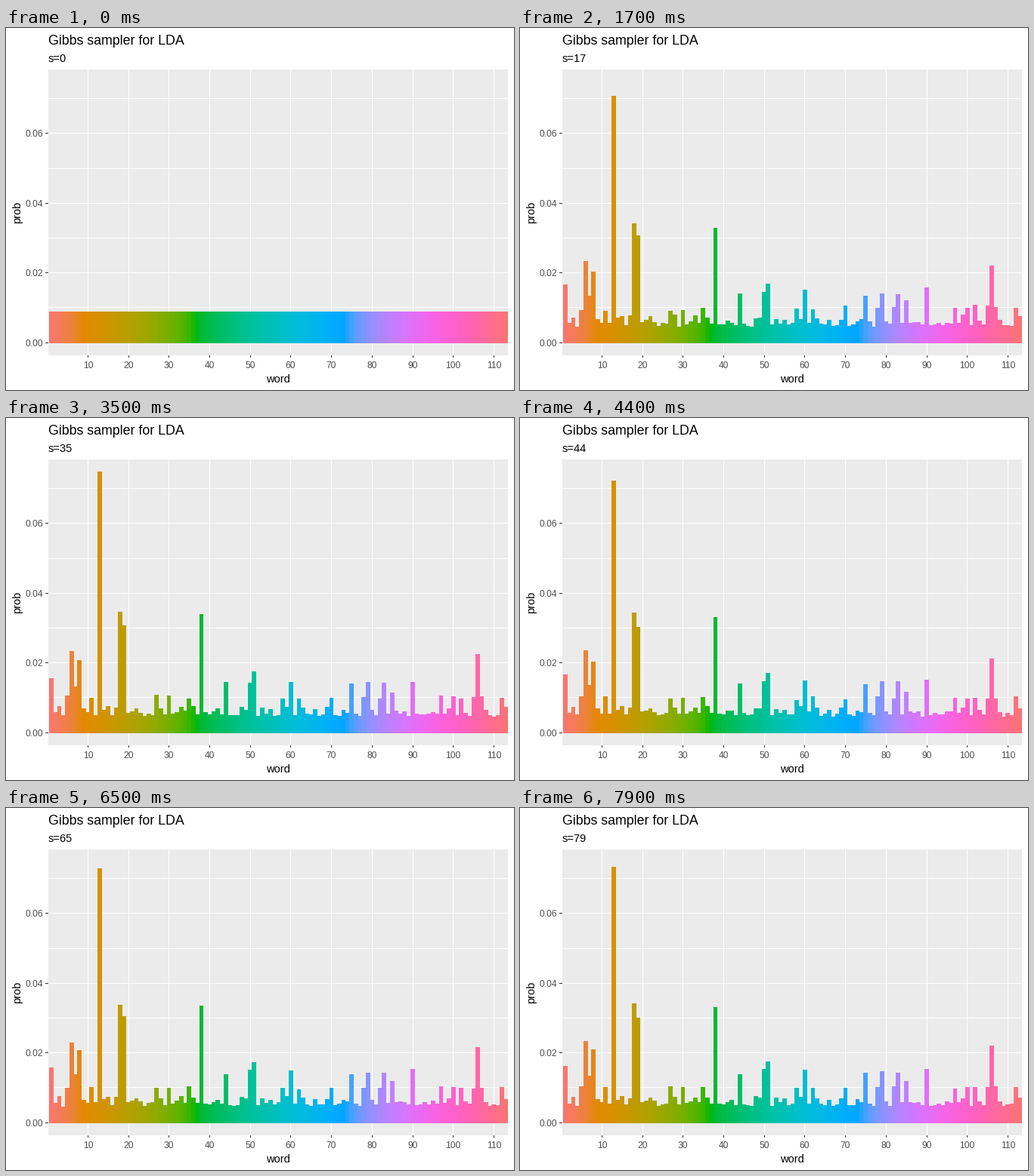
Recreate the animation shown at these times as a matplotlib script. Size 672 by 480 pixels, loop 8 s.

```python
import matplotlib.pyplot as plt
import numpy as np
from matplotlib.animation import FuncAnimation
from matplotlib.patches import Rectangle

W, H, DPI = 672, 480, 100
FRAMES, STEP_MS = 80, 100
LEFT, RIGHT, TOP, BOTTOM = 56, 664, 55, 434
X0, DX = 56.77, 5.373
Y0, DY = 416.72, 4624
BASE = 418
WORDS = 113

# The few frequent words, probabilities in units of 0.0001
PEAKS = {1: 160, 6: 232, 7: 138, 8: 207, 13: 728, 18: 342, 19: 301, 38: 327,
         44: 139, 50: 149, 51: 173, 60: 151, 75: 141, 79: 141, 83: 143,
         85: 118, 90: 153, 106: 218}
COMMON = [5, 11, 27, 30, 35, 58, 62, 70, 78, 82, 97, 100, 102, 105, 107, 112]


def x_px(word):
    return X0 + DX * (word - 0.5)


def y_px(prob):
    return np.round(Y0 - DY * prob)


def hue_colors(n):
    """Evenly spaced CIE-LUV hues at luminance 65 and chroma 100."""
    h = np.radians(15 + 360 * np.arange(n) / n)
    lum, chroma = 65, 100
    y = ((lum + 16) / 116) ** 3
    u = chroma * np.cos(h) / (13 * lum) + 0.1978398
    v = chroma * np.sin(h) / (13 * lum) + 0.4683363
    x = 9 * y * u / (4 * v)
    z = -x / 3 - 5 * y + 3 * y / v
    rgb = np.stack([3.240479 * x - 1.537150 * y - 0.498535 * z,
                    -0.969256 * x + 1.875992 * y + 0.041556 * z,
                    0.055648 * x - 0.204043 * y + 1.057311 * z], axis=1)
    rgb = np.clip(rgb, 0, 1)
    return np.where(rgb > 0.00304, 1.055 * rgb ** (1 / 2.4) - 0.055, 12.92 * rgb)


def typical_probs():
    """Mostly rare words just above a floor, plus the frequent ones."""
    p = 48 + 26 * np.random.default_rng(4).random(WORDS) ** 2
    p[np.array(COMMON) - 1] = 100
    for word, prob in PEAKS.items():
        p[word - 1] = prob
    return p


TYPICAL = typical_probs()


def sample(s):
    """Word probabilities after s sweeps; the spread settles with time."""
    if s == 0:
        return np.full(WORDS, 1 / WORDS)
    spread = (0.45 - 0.25 * s / FRAMES) * np.sqrt(TYPICAL)
    noise = np.random.default_rng(s).normal(size=WORDS)
    return (TYPICAL + spread * noise) / 1e4


fig = plt.figure(figsize=(W / DPI, H / DPI), dpi=DPI, facecolor="white")
ax = fig.add_axes([0, 0, 1, 1])
ax.axis("off")


def box(x, y, w, h, color, z):
    ax.add_patch(Rectangle((x, y), w, h, fc=color, lw=0, antialiased=False, zorder=z))


def label(x, y, text, px, color="black", **kw):
    return ax.text(x, y, text, fontsize=px * 72 / DPI, color=color,
                   family="Liberation Sans", **{"va": "baseline", **kw})


box(LEFT, TOP, RIGHT - LEFT, BOTTOM - TOP, "#EBEBEB", 0)
for k in range(8):
    y = y_px(k / 100)
    box(LEFT, y, RIGHT - LEFT, 1, "white", 1)
    if k % 2 == 0:
        box(LEFT - 4, y, 4, 1, "#333333", 1)
        label(49, y + 5, f"{k / 100:.2f}", 12, "#4D4D4D", ha="right")
for word in range(10, 111, 10):
    x = np.round(x_px(word))
    box(x, TOP, 1, BOTTOM - TOP, "white", 1)
    box(x, BOTTOM, 1, 3, "#333333", 1)
    label(x + 0.5, 451, str(word), 12, "#4D4D4D", ha="center")

label(56, 22, "Gibbs sampler for LDA", 17.75)
subtitle = label(56, 45, "s=0", 14.67)
label(360, 470, "word", 14.67, ha="center")
label(22, 244.5, "prob", 14.67, rotation=90, ha="right", va="center")

# Each bar reaches the next whole pixel; its right neighbour paints over it
words = np.arange(1, WORDS + 1)
starts = np.round(x_px(words - 0.5))
ends = np.floor(x_px(words + 0.5)) + 1
bars = ax.bar(starts, np.zeros(WORDS), ends - starts, bottom=BASE, align="edge",
              color=hue_colors(WORDS), linewidth=0, antialiased=False, zorder=2)
ax.set_xlim(0, W)
ax.set_ylim(H, 0)


def draw(s):
    for bar, top in zip(bars, y_px(sample(s))):
        bar.set_height(top - BASE)
    subtitle.set_text(f"s={s}")
    return [*bars, subtitle]


anim = FuncAnimation(fig, draw, frames=FRAMES, interval=STEP_MS,
                     init_func=lambda: draw(0), repeat=True, repeat_delay=0)
plt.show()
```
